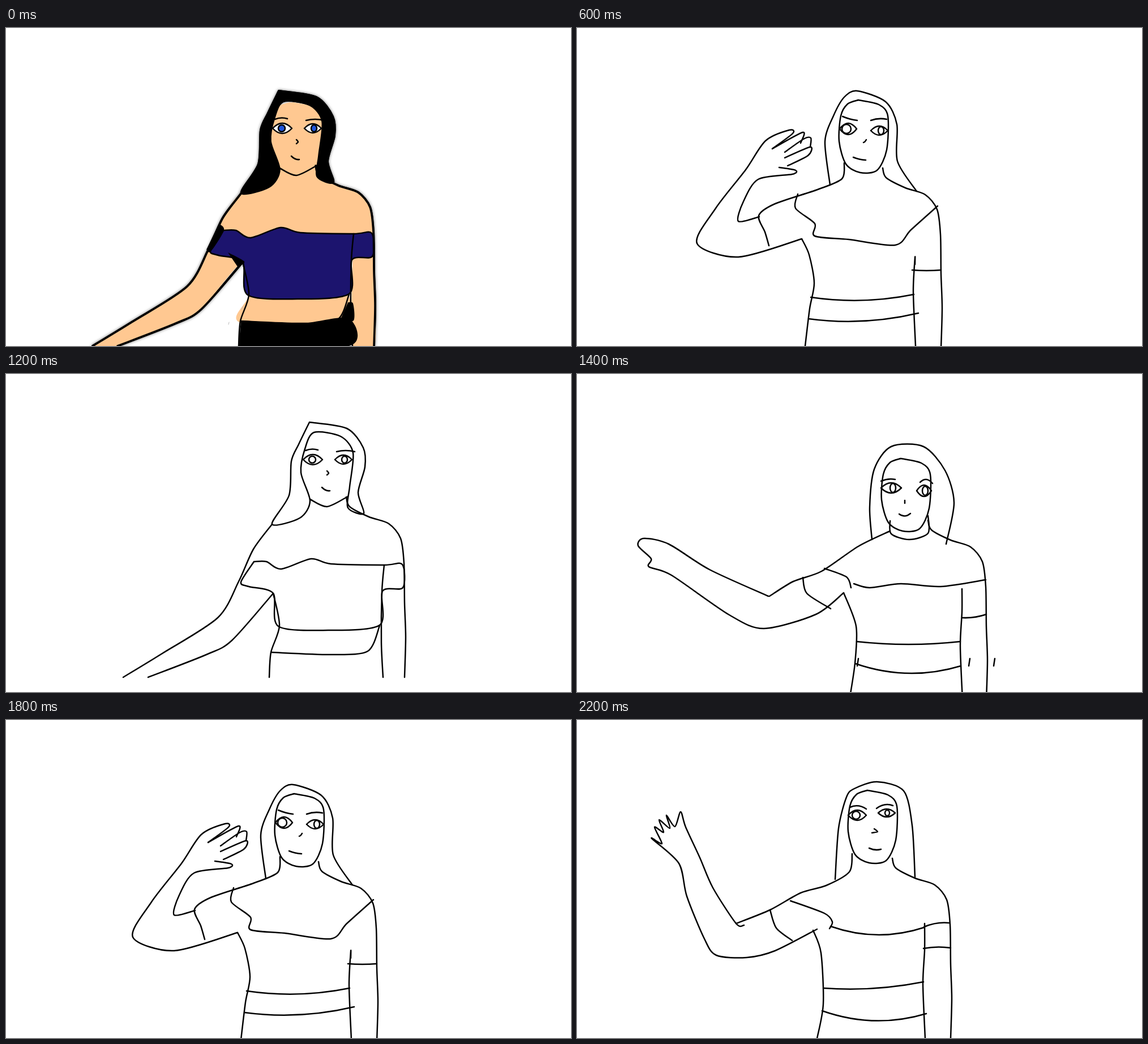
An HTML page with a canvas that plays this animation: 998 px wide and 561 px high, repeating every 2.4 s.

```html
<!DOCTYPE html>
<html lang="en">
<head>
<meta charset="utf-8">
<title>Waving woman</title>
<style>
  html, body { margin: 0; width: 100%; height: 100%; overflow: hidden; background: #fff; }
  canvas { display: block; }
</style>
</head>
<body>
<canvas id="stage" width="998" height="561"></canvas>
<script>
const ctx = document.getElementById('stage').getContext('2d');
const STEP = 200;
let turn = 0;

// Turns the forearm about the elbow, fading out towards the upper arm.
function bend(x, y) {
  const a = turn * Math.max(0, Math.min(1, (375 - y) / 70));
  const dx = x - 235, dy = y - 375, c = Math.cos(a), s = Math.sin(a);
  return [235 + dx * c - dy * s, 375 + dx * s + dy * c];
}

// Smooth curve through points given as x, y, x, y ...
function curve(n) {
  const path = new Path2D(), p = [];
  for (let i = 0; i < n.length; i += 2) p.push(bend(n[i], n[i + 1]));
  path.moveTo(...p[0]);
  for (let i = 1; i < p.length; i++) {
    const b = p[i - 1], c = p[i], a = p[i - 2] || b, d = p[i + 1] || c;
    path.bezierCurveTo(
      b[0] + (c[0] - a[0]) / 7, b[1] + (c[1] - a[1]) / 7,
      c[0] - (d[0] - b[0]) / 7, c[1] - (d[1] - b[1]) / 7, ...c);
  }
  return path;
}

const line = (...n) => ctx.stroke(curve(n));
const shift = (n, x, y) => n.map((v, i) => v + (i % 2 ? y : x));

function fill(color, n) {
  ctx.fillStyle = color;
  ctx.fill(curve(n));
}

function bow(x1, y1, x2, y2, sag) {
  ctx.beginPath();
  ctx.moveTo(x1, y1);
  ctx.quadraticCurveTo((x1 + x2) / 2, (y1 + y2) / 2 + 2 * sag, x2, y2);
  ctx.stroke();
}

function eye(x, y, rx, ry, ix, irx, iry, color) {
  ctx.beginPath();
  ctx.moveTo(x - rx, y);
  ctx.quadraticCurveTo(x, y - 2 * ry, x + rx, y);
  ctx.quadraticCurveTo(x, y + 2 * ry, x - rx, y);
  if (color) { ctx.fillStyle = '#fff'; ctx.fill(); }
  ctx.stroke();
  ctx.beginPath();
  ctx.ellipse(ix, y, irx, iry, 0, 0, 7);
  if (color) { ctx.fillStyle = color; ctx.fill(); }
  ctx.stroke();
}

// Parts that all poses share, moved a little each time.
const oval = [497, 127, 478, 134, 466, 155, 463, 200, 475, 240, 500, 255, 530, 251, 547, 215, 549, 155, 533, 135, 497, 127];
const flank = [540, 243, 546, 260, 580, 278, 615, 290, 636, 316, 642, 360, 643, 430, 645, 490, 643, 561];
const face = (x, y) => line(...shift(oval, x, y));

function rightArm(x, y, innerX, innerTop) {
  line(...shift(flank, x, y));
  line(innerX, innerTop, innerX, 405, innerX - 3, 465, innerX + 1, 561);
}

// Arm held out to the side.
function out() {
  line(449, 277, 445, 220, 453, 153, 483, 113, 540, 113, 578, 155, 594, 212, 580, 285);
  face(3, 7);
  line(481, 244, 483, 267, 515, 277, 548, 266, 548, 235);
  eye(483, 186, 18, 9, 486, 5, 8);
  eye(541, 191, 13, 10, 543, 5, 8);
  bow(465, 174, 490, 171, -2);
  bow(534, 176, 556, 178, -6);
  bow(507, 208, 507, 213, 0);
  bow(497, 232, 517, 231, 4);

  line(481, 262, 425, 289, 360, 333, 310, 351, 268, 377);
  line(266, 377, 162, 330, 90, 285, 46, 275, 36, 288, 59, 311, 55, 325, 95, 340, 197, 410, 258, 434, 350, 409, 399, 371);
  line(327, 344, 334, 372, 376, 399);
  line(399, 371, 421, 430, 419, 495, 409, 561);
  line(365, 328, 404, 343, 412, 362);
  line(417, 355, 445, 362, 500, 355, 570, 360, 650, 348);
  rightArm(8, 0, 608, 364);
  bow(609, 415, 651, 409, 2);
  bow(422, 457, 605, 457, 5);
  bow(420, 496, 606, 500, 15);
}

// Hand beside the face.
function near() {
  line(447, 277, 438, 200, 453, 155, 472, 122, 495, 111, 545, 130, 565, 170, 566, 235, 600, 288);
  face(0, 0);
  eye(479, 178, 15, 10, 476, 8, 8);
  eye(534, 181, 15, 8, 537, 5, 7);
  bow(469, 156, 495, 163, 1);
  bow(519, 163, 547, 161, -2);
  bow(511, 197, 506, 202, 1);
  bow(488, 228, 510, 233, 1);

  line(472, 238, 468, 266, 425, 285, 350, 310, 321, 331, 332, 360, 339, 384);
  line(322, 333, 285, 341, 294, 306, 320, 267, 380, 258, 386, 251, 357, 246);
  line(372, 243, 408, 225, 412, 210, 367, 229);
  line(412, 210, 413, 194, 400, 196, 367, 219);
  line(395, 203, 399, 184, 345, 213);
  line(345, 213, 381, 186, 375, 180, 333, 199, 298, 250, 245, 318, 212, 380, 285, 404, 397, 372);
  line(397, 372, 410, 400, 419, 450, 411, 495, 403, 561);
  line(390, 293, 386, 318, 420, 345, 420, 367, 480, 373, 562, 383, 590, 356, 637, 314);
  rightArm(0, 4, 597, 417);
  bow(592, 427, 643, 427, 1);
  bow(413, 475, 595, 470, 8);
  bow(409, 513, 603, 503, 9);
}

// Open hand raised; the angle swings the forearm.
function wave(angle = 0) {
  line(441, 280, 447, 190, 461, 135, 475, 120, 515, 108, 562, 124, 577, 185, 582, 276);
  face(1, -4);
  eye(480, 167, 16, 9, 478, 7, 7);
  eye(532, 163, 15, 7, 533, 4, 5);
  bow(467, 153, 496, 156, -4);
  bow(514, 155, 543, 150, -4);
  line(510, 191, 516, 196, 506, 198);
  bow(501, 225, 522, 227, 2);

  turn = angle;
  line(280, 361, 266, 358, 225, 295, 202, 242, 177, 188, 168, 161, 158, 187, 143, 167, 149, 190, 130, 175, 138, 197, 122, 188, 135, 217, 117, 208, 165, 252, 179, 310, 210, 385, 231, 414, 285, 418, 335, 406, 409, 368);
  turn = 0;
  line(471, 235, 466, 267, 425, 291, 380, 304, 326, 334, 266, 358);
  line(402, 370, 416, 410, 420, 500, 409, 561);
  line(326, 334, 337, 366, 365, 388);
  line(362, 318, 422, 340, 436, 355, 431, 367);
  bow(433, 363, 598, 365, 14);
  bow(598, 364, 643, 357, -3);
  rightArm(2, 0, 599, 358);
  bow(597, 402, 645, 401, -2);
  bow(420, 472, 597, 461, 6);
  bow(418, 512, 602, 517, 15);
}

const locks = [482, 111, 548, 122, 577, 156, 580, 190, 568, 235, 578, 272, 550, 262, 553, 225, 559, 165, 537, 136, 490, 129, 474, 158, 467, 200, 483, 250, 465, 280, 416, 291, 446, 240, 450, 180, 463, 150, 482, 111];
const upper = [153, 561, 222, 519, 320, 456, 357, 392, 383, 335, 416, 291];
const lower = [418, 413, 345, 496, 300, 521, 197, 561];
const top1 = [384, 357, 406, 357, 432, 370, 485, 352, 520, 361, 614, 363, 646, 362, 647, 403, 611, 409, 606, 469, 515, 478, 427, 471, 418, 413, 375, 401, 361, 393, 384, 357];

function limbs() {
  line(...locks);
  line(...upper);
  line(...lower);
  line(...shift(flank, 7, 0));
}

// Arm hanging low.
function low(iris) {
  limbs();
  ctx.lineWidth = 2.5;
  line(483, 247, 513, 260, 550, 242);
  eye(488, 177, 17, 9, 487, 6, 6, iris);
  eye(542, 177, 15, 8, 544, 5, 6, iris);
  bow(475, 161, 497, 160, -2);
  bow(530, 163, 562, 163, -2);
  line(513, 197, 516, 201, 513, 204);
  bow(504, 226, 518, 232, 2);
  line(...top1);
  line(418, 413, 429, 470, 414, 517, 411, 561);
  line(614, 363, 610, 410, 609, 500, 612, 561);
  line(415, 517, 520, 521, 585, 515, 606, 470);
}

function painted() {
  ctx.save();
  ctx.lineWidth = 4;
  ctx.shadowColor = 'rgba(0,0,0,.6)';
  ctx.shadowBlur = 5;
  limbs();
  ctx.restore();

  const skin = '#ffc891';
  fill(skin, [...shift(flank, 7, 0), 612, 561, 612, 410, 606, 470, 606, 520, 415, 520, 429, 470, ...lower, ...upper, 470, 276, 483, 250]);
  fill(skin, shift(oval, 4, 4));
  fill(skin, shift(oval, 10, 4));
  fill('#1c146e', top1);
  fill('#000', locks);
  fill('#000', [415, 516, 520, 521, 605, 512, 606, 561, 411, 561]);
  fill('#000', [376, 345, 385, 357, 362, 394, 354, 391]);
  fill('#000', [392, 396, 421, 412, 409, 421]);
  fill('#000', [604, 484, 613, 486, 614, 516, 590, 516]);
  ctx.lineWidth = 3.6;
  low('#1f55dc');
  ctx.strokeStyle = '#bbb';
  ctx.lineWidth = 1;
  bow(419, 491, 416, 497, 0);
  bow(394, 519, 393, 523, 0);
}

// Small stray marks beside the hips.
function ticks() {
  for (const x of [425, 622, 666]) bow(x, 487, x - 2, 500, 0);
}

const poses = [
  [painted], [out], [() => wave(0.3)], [near], [() => wave(0.55), 1], [wave],
  [low, 54, -26], [() => { out(); ticks(); }, 72, 15],
  [() => wave(0.3), 20, 2], [near, 12, 3], [() => wave(0.55), 27, 1], [wave, 15, 1]
];

function draw([pose, x = 0, y = 0]) {
  ctx.fillStyle = '#fff';
  ctx.fillRect(0, 0, 998, 561);
  ctx.save();
  ctx.lineCap = ctx.lineJoin = 'round';
  ctx.lineWidth = 2.5;
  ctx.translate(x, y);
  pose();
  ctx.restore();
}

const start = performance.now();
let shown = -1;

function frame() {
  const step = Math.floor((performance.now() - start) / STEP) % poses.length;
  if (step !== shown) draw(poses[shown = step]);
  requestAnimationFrame(frame);
}
frame();
</script>
</body>
</html>
```
